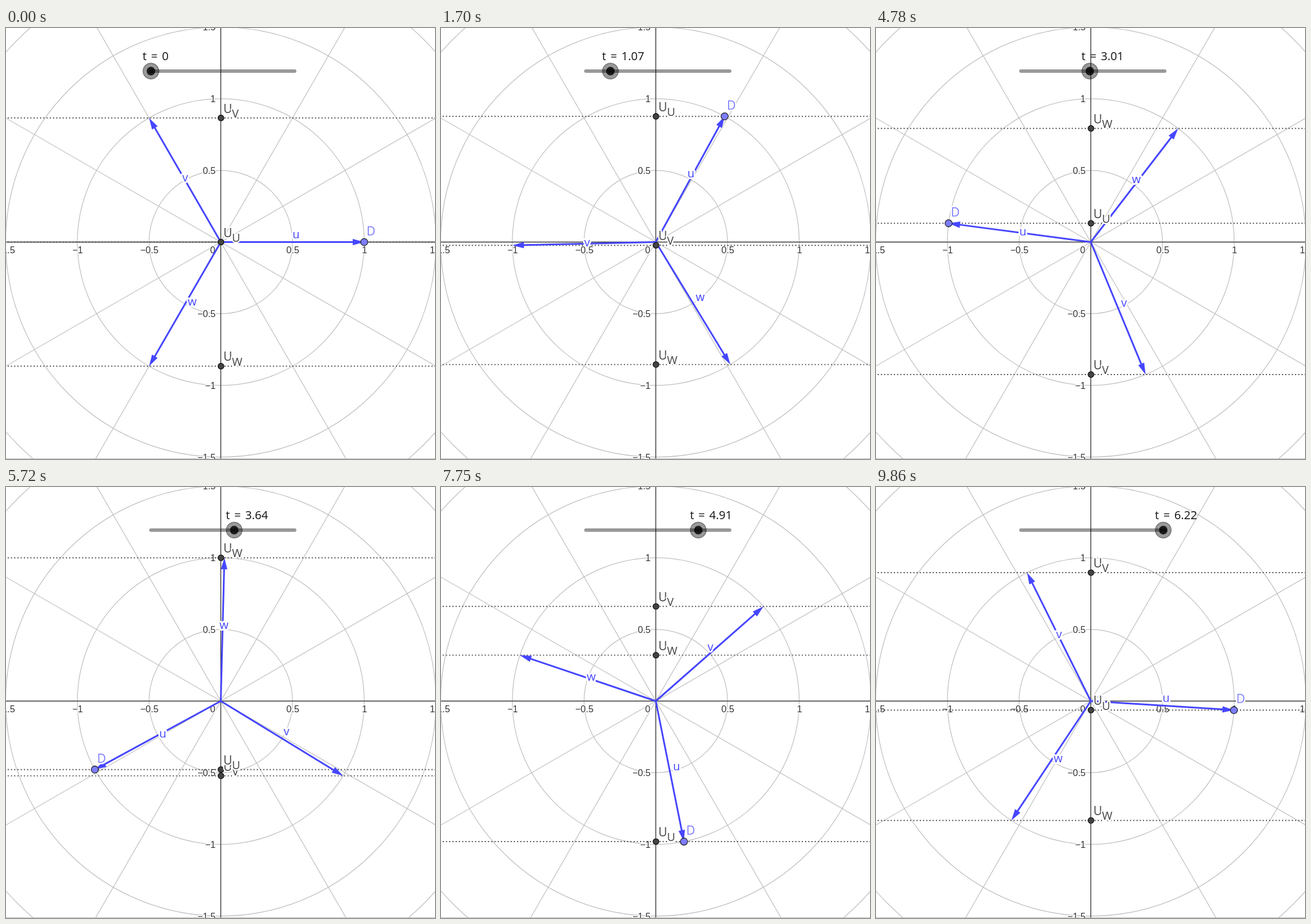
These frames come from a looping animation (746 by 750 pixels, 9.89 s). An HTML page with a canvas:

```html
<!DOCTYPE html>
<html lang="en">
<head>
<meta charset="utf-8">
<title>Three rotating phasors</title>
<style>
  html, body { margin: 0; width: 100%; height: 100%; overflow: hidden; background: #fff; }
  canvas { display: block; width: 746px; height: 750px; }
</style>
</head>
<body>
<canvas id="stage" width="746" height="750"></canvas>
<script>
const ctx = document.getElementById('stage').getContext('2d');
const W = 746, H = 750, LOOP = 9890;
const CX = 373.5, CY = 372.5, UNIT = 249.4;
const SANS = '"Open Sans", "Noto Sans", sans-serif';
const ARIAL = '"Liberation Sans", Arial, sans-serif';
const BLUE = '#4646ff', PALE = '#7d7dff', DARK = '#444', SHADE = 'rgba(0,0,0,.4)';

// Bursts of evenly spaced updates: first ms, last ms, count
const bursts = [
  [50, 1000, 15], [1080, 1700, 11], [1770, 2030, 6], [2080, 2680, 12],
  [2820, 3230, 9], [3310, 3780, 11], [3830, 4780, 14], [4830, 5720, 15],
  [5810, 5810, 1], [5850, 6810, 15], [6910, 7750, 17], [7780, 7860, 3],
  [7910, 8800, 15], [8900, 9860, 17]
];
const ticks = [0];
for (const [from, to, n] of bursts)
  for (let i = 0; i < n; i++) ticks.push(from + (n > 1 ? (to - from) * i / (n - 1) : 0));

// Slider value over time: ms, t
const knots = [[0, 0], [1700, 1.07], [3230, 2.02], [4780, 3.01], [5720, 3.64], [7750, 4.91], [9860, 6.22]];

function valueAt(ms) {
  const i = Math.max(1, knots.findIndex(k => k[0] >= ms));
  const [a, p] = knots[i - 1], [b, q] = knots[i];
  return +(p + (q - p) * (ms - a) / (b - a)).toFixed(2);
}

function line(x1, y1, x2, y2, color, width) {
  ctx.strokeStyle = color;
  ctx.lineWidth = width;
  ctx.beginPath();
  ctx.moveTo(x1, y1);
  ctx.lineTo(x2, y2);
  ctx.stroke();
}

function disc(x, y, r, fill, edge, width = 1.3) {
  ctx.beginPath();
  ctx.arc(x, y, r, 0, 2 * Math.PI);
  if (fill) { ctx.fillStyle = fill; ctx.fill(); }
  if (edge) { ctx.strokeStyle = edge; ctx.lineWidth = width; ctx.stroke(); }
}

function text(str, x, y, font, color, halo = 0, align = 'left') {
  ctx.font = font;
  ctx.textAlign = align;
  if (halo) {
    ctx.strokeStyle = '#fff';
    ctx.lineWidth = halo;
    ctx.lineJoin = 'round';
    ctx.strokeText(str, x, y);
  }
  ctx.fillStyle = color;
  ctx.fillText(str, x, y);
}

function grid() {
  for (let k = 1; k <= 4; k++) disc(CX, CY, k * UNIT / 2, null, '#c0c0c0', 1.25);
  for (let a = 30; a < 180; a += 30) {
    if (a === 90) continue;
    const dx = 600 * Math.cos(a * Math.PI / 180), dy = 600 * Math.sin(a * Math.PI / 180);
    line(CX - dx, CY - dy, CX + dx, CY + dy, '#c0c0c0', 1.25);
  }
  line(0, CY, W, CY, '#333', 1.4);
  line(CX, 0, CX, H, '#333', 1.4);
  line(0, H - 0.5, W, H - 0.5, '#bbb', 1);
  const font = '16px ' + ARIAL;
  for (let k = -3; k <= 3; k++) {
    if (!k) continue;
    const name = String(k / 2).replace('-', '\u2212');
    text(name, CX + k * UNIT / 2 + 0.5, 392, font, '#333', 3, 'center');
    text(name, 364.5, CY - k * UNIT / 2 + 6, font, '#333', 3, 'right');
  }
  text('0', 364, 392, font, '#333', 3, 'right');
}

function arrow(angle) {
  const head = 20, half = 5.6;
  ctx.save();
  ctx.translate(CX, CY);
  ctx.rotate(-angle);
  line(0, 0, UNIT - head + 2, 0, BLUE, 3);
  ctx.fillStyle = BLUE;
  ctx.beginPath();
  ctx.moveTo(UNIT, 0);
  ctx.lineTo(UNIT - head, -half);
  ctx.lineTo(UNIT - head, half);
  ctx.fill();
  ctx.restore();
}

function slider(t) {
  const x = 252 + t * 39.8, y = 75;
  ctx.lineCap = 'round';
  line(252, y, 502, y, SHADE, 6);
  ctx.lineCap = 'butt';
  disc(x, y, 13.8, SHADE, SHADE, 1.4);
  disc(x, y, 7.4, 'rgba(0,0,0,.82)');
  ctx.wordSpacing = '2.4px';
  text('t = ' + t, x - 14.5, 56, '20px ' + SANS, '#111');
  ctx.wordSpacing = '0px';
}

function draw(t) {
  ctx.fillStyle = '#fff';
  ctx.fillRect(0, 0, W, H);
  grid();

  const phasors = ['w', 'v', 'u'].map((name, i) => {
    const angle = t + (2 - i) * 2 * Math.PI / 3;
    const cos = Math.cos(angle), sin = Math.sin(angle);
    return { name, angle, cos, sin, x: CX + UNIT * cos, y: CY - UNIT * sin };
  });
  const tip = phasors[2];

  ctx.setLineDash([1.875, 3.75]);
  for (const p of phasors) line(3, p.y, W, p.y, DARK, 1.9);
  ctx.setLineDash([]);
  for (const p of phasors) arrow(p.angle);
  for (const p of phasors) disc(CX + 0.3, p.y, 5, DARK, '#111');
  disc(tip.x, tip.y, 6.2, PALE, '#222');

  const font = '21px ' + SANS;
  for (const p of phasors) {
    text(p.name, CX + UNIT / 2 * p.cos - 5.5 * p.sin,
      CY - UNIT / 2 * p.sin - 5.5 * p.cos - 0.7, '20px ' + SANS, BLUE, 6);
  }
  for (const p of phasors) {
    text('U', 378, p.y - 9, font, DARK, 5);
    text(p.name.toUpperCase(), 393, p.y - 0.7, '19.5px ' + SANS, DARK, 5);
  }
  text('D', tip.x + 4, tip.y - 11.8, font, PALE, 5);
  slider(t);
}

let start;
function frame(now) {
  if (start === undefined) start = now;
  const ms = (now - start) % LOOP;
  let held = 0;
  for (const tick of ticks) if (tick <= ms + 0.01) held = tick;
  draw(valueAt(held));
  requestAnimationFrame(frame);
}
requestAnimationFrame(frame);
</script>
</body>
</html>
```
